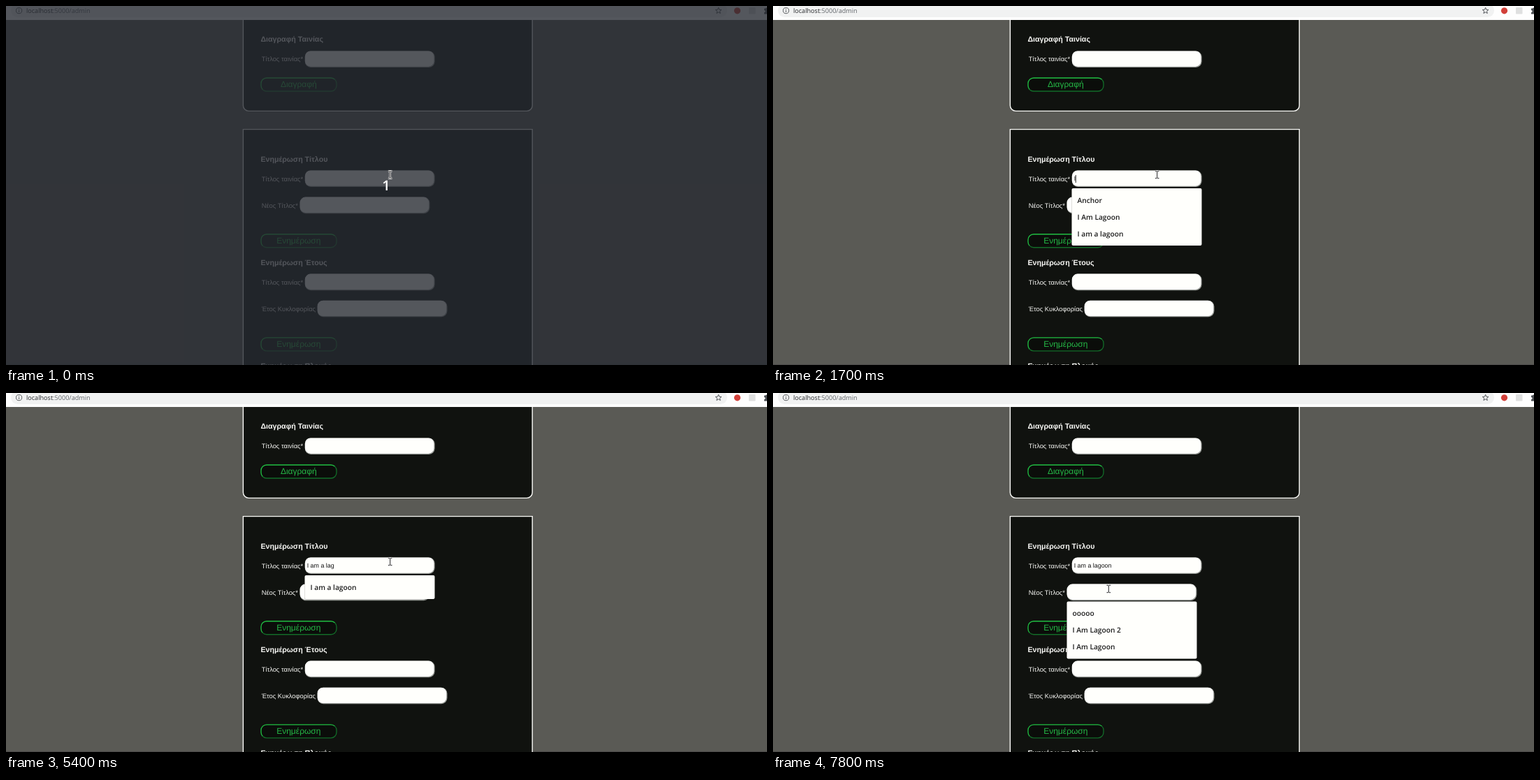
Recreate the animation shown at these times as an HTML page. Size 1089 by 514 pixels, loop 8000 ms.

```html
<!DOCTYPE html>
<html lang="el">
<head>
<meta charset="utf-8">
<title>Admin</title>
<style>
  html, body { margin: 0; width: 100%; height: 100%; overflow: hidden; background: #5a5a55; }
  svg { display: block; width: 1089px; height: 514px; text-rendering: geometricPrecision; }
  text { white-space: pre; }
  .page { font-family: "Liberation Sans", Arial, sans-serif; fill: #f8f8f5; }
  .head { font-size: 10.67px; font-weight: 700; }
  .label { font-size: 9.33px; }
  .btn { font-size: 12px; fill: #25b846; text-anchor: middle; }
  .typed { font-size: 8.89px; fill: #111; }
  .ui { font-family: "Open Sans", "Noto Sans", sans-serif; }
  .url { font-size: 9.1px; fill: #5f6368; }
  .item { font-size: 10.2px; font-weight: 600; fill: #1c1c1c; }
</style>
</head>
<body>
<svg viewBox="0 0 1089 514" xmlns="http://www.w3.org/2000/svg">
  <rect width="1089" height="514" fill="#5a5a55"/>
  <rect y="513" width="1089" height="1" fill="#4b4a49"/>

  <g id="browser">
    <rect width="1089" height="20" fill="#fefefe"/>
    <rect x="7" y="-3" width="1025" height="19" rx="9.5" fill="#f1f2f2"/>
    <g fill="none" stroke="#55585c">
      <circle cx="18.6" cy="6.6" r="4.1"/>
      <path d="M18.6 6.1v2.8M18.6 4.1v1.1"/>
      <path id="star" stroke-linejoin="round"/>
    </g>
    <text class="ui url" x="29" y="10"><tspan fill="#26282b">localhost</tspan>:5000/admin</text>
    <circle cx="1046.5" cy="6.8" r="4.6" fill="#d2403a"/>
    <rect x="1063" y="2" width="9.5" height="9.5" rx="1" fill="#dfe0e0"/>
    <path d="M1085 3.6h2a1.6 1.6 0 0 1 3 0v8h-5v-2.4a1.6 1.6 0 0 0 0-3.2z" fill="#4a4d51"/>
  </g>

  <g fill="#10120f" stroke="#fbfbf8" stroke-width="1.4">
    <path d="M339.4 20V142.4a8 8 0 0 0 8 8H745.2a8 8 0 0 0 8-8V20"/>
    <path d="M339.4 516V176.6H753.2V516"/>
  </g>
  <g id="form" class="page"></g>
  <text id="typed" class="page typed" x="430.7" y="250.3"></text>
  <rect id="caret" width="0.9" height="11" fill="#111"/>
  <g id="popup"></g>

  <g id="veil">
    <rect width="1089" height="514" fill="#272a32" fill-opacity="0.79"/>
    <text class="ui" x="544" y="264.3" font-size="20" font-weight="600" fill="#fff" text-anchor="middle">1</text>
  </g>
  <g id="pointer" fill="none">
    <path id="beam" d="M-2.8-5.2H-.9L0-4.5.9-5.2H2.8M0-4.5V4.5M-2.8 5.2H-.9L0 4.5.9 5.2H2.8" stroke="#fff" stroke-width="2.4"/>
    <use href="#beam"/>
  </g>
</svg>
<script>
const LOOP = 8000, BLINK = 620, LAG = 100;
const FOCUS = 600, REFOCUS = 7500;
const PHRASE = 'I am a lagoon';
const TITLES = ['Anchor', 'I Am Lagoon', PHRASE];
const NEW_TITLES = ['ooooo', 'I Am Lagoon 2', 'I Am Lagoon'];

const $ = id => document.getElementById(id);
const clamp = (v, lo = 0, hi = 1) => Math.min(hi, Math.max(lo, v));
const show = (el, on) => el.setAttribute('visibility', on ? 'visible' : 'hidden');

function add(parent, tag, attrs, content) {
  const el = document.createElementNS('http://www.w3.org/2000/svg', tag);
  for (const k in attrs) el.setAttribute(k, attrs[k]);
  if (content) el.textContent = content;
  parent.appendChild(el);
  return el;
}

// --- form: every section flows down from its heading ---
const form = $('form');

function field(y, label) {
  const left = 365.7;
  const text = add(form, 'text', { class: 'label', x: left, y: y + 15 }, label);
  const x = left + text.getComputedTextLength() + 2.6;
  add(form, 'rect', { x, y, width: 185.8, height: 23.6, rx: 8.5, fill: '#989b97' });
  add(form, 'rect', { x, y, width: 184.6, height: 22.3, rx: 8, fill: '#fffffc' });
}

function button(y, label) {
  const x = 365, w = 108, h = 19, r = 8, k = r * 0.293;
  const top = y + 0.5, bottom = top + h, right = x + w;
  const edge = (d, stroke) => add(form, 'path', { d, stroke, fill: 'none', 'stroke-width': 1.35 });
  const arc = (px, py) => `A${r} ${r} 0 0 1 ${px} ${py}`;
  add(form, 'rect', { x, y: top, width: w, height: h, rx: r, fill: '#0b0d0a' });
  edge(`M${x + k} ${bottom - k}${arc(x, bottom - r)}V${top + r}${arc(x + r, top)}H${right - r}${arc(right - k, top + k)}`, '#20bd42');
  edge(`M${right - k} ${top + k}${arc(right, top + r)}V${bottom - r}${arc(right - r, bottom)}H${x + r}${arc(x + k, bottom - k)}`, '#126b28');
  add(form, 'text', { class: 'btn', x: 418.8, y: y + 13.6 }, label);
}

// Returns the baseline of the next heading.
function section(y, title, labels, action) {
  add(form, 'text', { class: 'head', x: 364.4, y }, title);
  labels.forEach((s, i) => field(y + 13 + 38.1 * i, s));
  const foot = y + 13 + 38.1 * labels.length + (labels.length > 1 ? 14.5 : 0);
  button(foot, action);
  return foot + 44.4;
}

section(51.4, 'Διαγραφή Ταινίας', ['Τίτλος ταινίας*'], 'Διαγραφή');
let y = section(222.5, 'Ενημέρωση Τίτλου', ['Τίτλος ταινίας*', 'Νέος Τίτλος*'], 'Ενημέρωση');
y = section(y, 'Ενημέρωση Έτους', ['Τίτλος ταινίας*', 'Έτος Κυκλοφορίας'], 'Ενημέρωση');
add(form, 'text', { class: 'head', x: 364.4, y }, 'Ενημέρωση Πλοκής');

$('star').setAttribute('d', 'M' + Array.from({ length: 10 }, (_, i) => {
  const r = i % 2 ? 2 : 4.6, a = i * Math.PI / 5;
  return (1019.6 + r * Math.sin(a)) + ' ' + (6.8 - r * Math.cos(a));
}).join('L') + 'Z');
add($('pointer'), 'path', { d: $('beam').getAttribute('d'), stroke: '#222' });
$('pointer').querySelector('use').remove();

// --- typing: bursts of evenly paced keys ---
const bursts = [
  { start: 1700, pace: 890, keys: 2 },
  { start: 2590, pace: 310, keys: 8 },
  { start: 5500, pace: 200, keys: 3 }
];

function typing(t) {
  let count = 0, last = FOCUS;
  for (const { start, pace, keys } of bursts) {
    const n = clamp(Math.floor((t - start) / pace) + 1, 0, keys);
    if (n) last = start + (n - 1) * pace;
    count += n;
  }
  return { text: PHRASE.slice(0, count), last };
}

// --- suggestions: prefix matches, sorted once there is a query ---
function matches(query) {
  const q = query.toLowerCase();
  if (!q) return TITLES;
  return TITLES.filter(s => s.toLowerCase().startsWith(q))
    .sort((a, b) => a.toLowerCase() < b.toLowerCase() ? -1 : 1);
}

let shown = '';
function popup(x, y, items, alpha) {
  const g = $('popup'), key = x + items.join();
  g.setAttribute('opacity', alpha);
  if (key === shown) return;
  shown = key;
  g.textContent = '';
  const h = 10 + 24 * items.length;
  add(g, 'rect', { x: x - 0.5, y: y - 0.2, width: 187, height: h + 0.9, rx: 2.5, fill: '#000', 'fill-opacity': 0.25 });
  add(g, 'rect', { x, y, width: 186, height: h, rx: 2, fill: '#fffffc' });
  items.forEach((s, i) => add(g, 'text', { class: 'ui item', x: x + 8, y: y + 20.8 + 24 * i }, s));
}

// --- pointer: two glides with a short rest, at ten steps a second ---
function pointer(t) {
  const step = Math.floor(t / 100) * 100;
  const a = clamp((step - 6500) / 200), b = clamp((step - 6800) / 300);
  return [549.7 - 16.7 * a - 52.7 * b, 241.5 + 19.5 * a + 19.5 * b];
}

function draw(t) {
  show($('veil'), t < 500);

  const { text, last } = typing(t), typed = $('typed'), caret = $('caret');
  const second = t >= REFOCUS;
  typed.textContent = text;
  caret.setAttribute('x', second ? 423.1 : 430.3 + typed.getComputedTextLength());
  caret.setAttribute('y', second ? 280 : 242);
  show(caret, t >= FOCUS && Math.floor((t - last) / BLINK) % 2 === 0);

  if (second) {
    popup(420.5, 298.6, NEW_TITLES, t < REFOCUS + LAG ? 0 : 1);
  } else {
    const fade = text === PHRASE ? clamp(1 - (t - last - LAG / 2) / 250) : 1;
    popup(427.5, 261, matches(typing(t - LAG).text), text ? fade : 0);
  }

  $('pointer').setAttribute('transform', `translate(${pointer(t)})`);
}

function tick() {
  draw(performance.now() % LOOP);
  requestAnimationFrame(tick);
}
tick();
</script>
</body>
</html>
```
